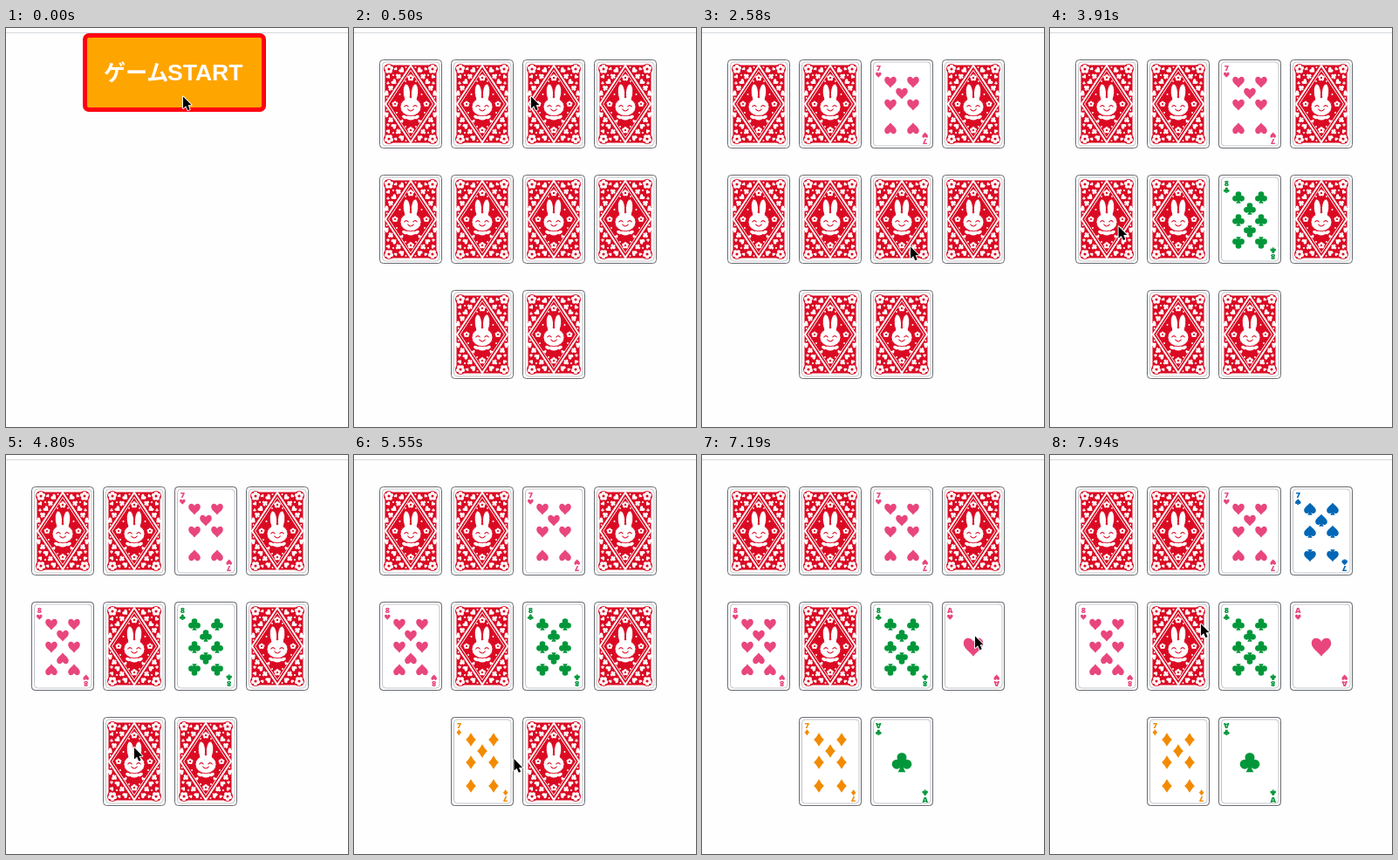
Write an HTML page that moves like this. It is 392 px wide and 457 px high and loops after 8000 ms.

```html
<!DOCTYPE html>
<html lang="ja">
<head>
<meta charset="utf-8">
<title>ゲーム</title>
<style>
html, body { margin: 0; width: 100%; height: 100%; overflow: hidden; background: #fefefe; }
svg { display: block; width: 392px; height: 457px; }
.label { font-weight: 700; fill: #fff; }
.kana { font-family: "Noto Sans CJK JP", "Noto Sans CJK", sans-serif; font-size: 25px; }
.latin { font-family: "Liberation Sans", sans-serif; font-size: 26.5px; }
.rank { font: 800 9px "Open Sans", sans-serif; text-anchor: middle; }
</style>
</head>
<body>
<svg id="stage" viewBox="0 0 392 457" xmlns="http://www.w3.org/2000/svg"></svg>
<script>
const LOOP = 8000, DEAL = 500, TICK0 = 496, TICK = 148.8;
const RED = '#db0a23';

const HEART = 'M0 9.5C-3 5-10 1.5-10-3.8C-10-10.6-2-10.6 0-5.5C2-10.6 10-10.6 10-3.8C10 1.5 3 5 0 9.5Z';
const STEM = '<path d="M-1.2 1H1.2Q1.4 7 4 10H-4Q-1.4 7-1.2 1Z"/>';
const SUITS = {
  heart: { color: '#e8467c', art: `<path d="${HEART}"/>` },
  diamond: { color: '#f28b00', art: '<path d="M0-11.5Q4-4 8.6 0Q4 4 0 11.5Q-4 4-8.6 0Q-4-4 0-11.5Z"/>' },
  club: {
    color: '#00973a',
    art: '<circle cy="-5" r="4.9"/><circle cx="-5.2" cy="2" r="4.9"/><circle cx="5.2" cy="2" r="4.9"/>' +
      '<circle r="3"/>' + STEM
  },
  spade: { color: '#0067b6', art: `<path d="${HEART}" transform="translate(0 -1.5) scale(1 -.95)"/>` + STEM }
};

// column, row, rank, suit, tick at which the card turns
const CARDS = [
  [0, 0], [1, 0], [2, 0, '7', 'heart', 9], [3, 0, '7', 'spade', 48],
  [0, 1, '8', 'heart', 24], [1, 1], [2, 1, '8', 'club', 17], [3, 1, 'A', 'heart', 44],
  [1, 2, '7', 'diamond', 31], [2, 2, 'A', 'club', 38]
];

// start tick, end tick, destination of the pointer
const MOVES = [
  [5, 7.6, 222, 98], [11, 14, 238, 249], [18, 23, 59, 223], [25, 29, 162, 354], [31, 36, 220, 333],
  [38, 39, 222, 327], [39, 42, 312, 206], [44, 46, 306, 107], [48, 50, 172, 192]
];

const at = (x, y, s, art, turn = 0) =>
  `<g transform="translate(${x} ${y}) rotate(${turn}) scale(${s})">${art}</g>`;

const paper = `<rect x=".5" y=".5" width="71" height="101" rx="4" fill="#fff" stroke="#686b70"/>
  <rect x="3.5" y="3" width="65.5" height="96" rx="4" fill="none" stroke="#a9adb3" stroke-width=".7"/>`;

function flower(x, y, r) {
  let petals = '';
  for (let i = 0; i < 5; i++) {
    const a = (i * 72 - 90) * Math.PI / 180;
    petals += `<circle cx="${x + r * .6 * Math.cos(a)}" cy="${y + r * .6 * Math.sin(a)}" r="${r * .46}"/>`;
  }
  return petals + `<circle cx="${x}" cy="${y}" r="${r * .32}" fill="${RED}"/>`;
}

const dot = (x, y, r) => `<circle cx="${x}" cy="${y}" r="${r}"/>`;

// one corner of the back: a flower and a row of suits along the diamond
function cornerArt() {
  const { heart, club } = SUITS;
  let row = '';
  for (let i = 0; i < 5; i++) {
    row += at(26 - i * 4.4, 12.5 + i * 6.7, .32, (i % 2 ? club : heart).art, -50);
  }
  return `<circle cx="11" cy="11" r="6" fill="${RED}"/>` + flower(11, 11, 4.9) + row +
    at(19, 11, .2, heart.art, -40) + at(10.5, 20, .24, heart.art, -40) + at(10, 27, .18, club.art) +
    dot(30.5, 9, 1) + dot(16, 18, 1.1) + dot(8.7, 44, .9);
}

function backArt() {
  const diamond = (inset, w) =>
    `<path d="M36 ${7 + inset * 1.5}L${65 - inset} 51L36 ${95 - inset * 1.5}L${7 + inset} 51Z" fill="${RED}" stroke="#fff" stroke-width="${w}"/>`;
  const corner = cornerArt();
  const mirrored = [[1, 1], [-1, 1], [1, -1], [-1, -1]].map(([sx, sy]) =>
    `<g transform="translate(36 51) scale(${sx} ${sy}) translate(-36 -51)">${corner}</g>`).join('');
  const sides = [-1, 1].map(s =>
    flower(36 + s * 18, 51, 3.3) + dot(36 + s * 6, 25, .9) + dot(36 + s * 12.5, 40, 1) +
    dot(36 + s * 16, 61, 1) + at(36 + s * 10, 71, .2, SUITS.heart.art, s * 30) + dot(36 + s * 6, 77, 1)).join('');
  return paper + `<rect x="6.5" y="6.5" width="59" height="89" rx="2" fill="${RED}"/>
    <g fill="#fff">${mirrored}${diamond(0, 2)}${diamond(3.6, 1)}
    ${flower(36, 21, 3.7)}${flower(36, 81, 3.7)}${sides}
    <ellipse cx="36" cy="66.5" rx="5.5" ry="3"/>
    <ellipse cx="29" cy="66" rx="3" ry="1.9" transform="rotate(25 29 66)"/>
    <ellipse cx="43" cy="66" rx="3" ry="1.9" transform="rotate(-25 43 66)"/>
    <g stroke="${RED}" stroke-width=".9">
      <ellipse cx="31.4" cy="38" rx="4.1" ry="10" transform="rotate(-4 31.4 38)"/>
      <ellipse cx="40.6" cy="38" rx="4.1" ry="10" transform="rotate(4 40.6 38)"/>
      <ellipse cx="36" cy="54.3" rx="12" ry="10.4"/>
    </g>
    <path d="M29.5 43H34.5L36 45L37.5 43H42.5L43 48H29Z"/></g>
    <g fill="none" stroke="${RED}" stroke-width="1.1" stroke-linecap="round">
      <path d="M28.7 54Q31 51.2 33.2 54M38.8 54Q41 51.2 43.3 54M32.7 57Q36 61 39.3 57"/>
    </g>`;
}

function pips(rank) {
  if (rank === 'A') return [[36, 52, 1.12]];
  const low = rank === '8' ? 78 : 79;
  const list = [[36, 39]];
  for (const x of [23, 49]) list.push([x, 26], [x, 52], [x, low, .68, 180]);
  if (rank === '8') list.push([36, 65, .68, 180]);
  return list;
}

function faceArt(rank, suit) {
  const { color, art } = SUITS[suit];
  const turned = rank === 'A' && suit === 'club';
  const index = `<g transform="translate(9.3 9.8)${turned ? ' rotate(180)' : ''}"><text class="rank" y="3.2">${rank}</text></g>` +
    at(9.3, 17.7, .33, art);
  return paper + `<g fill="${color}">${index}<g transform="rotate(180 36 52.2)">${index}</g>` +
    pips(rank).map(([x, y, s = .68, turn = 0]) => at(x, y, s, art, turn)).join('') + '</g>';
}

const stage = document.getElementById('stage');
stage.innerHTML = `<defs><g id="back">${backArt()}</g></defs>
  <rect width="392" height="457" fill="#fefefe"/>
  <path d="M0 5.5H392" stroke="#d5d9dd"/>
  <g id="start">
    <rect x="90.5" y="8.5" width="205" height="85" rx="4.5" fill="#ffa500" stroke="#ff0011" stroke-width="5"/>
    <text class="label kana" x="112" y="60">ゲーム</text>
    <text class="label latin" x="185" y="60.3">START</text>
  </g>
  <g id="table">${CARDS.map(([col, row, rank, suit]) =>
    `<g transform="translate(${29 + col * 82} ${36 + row * 132})"><use href="#back"/>` +
    (rank ? `<g class="face">${faceArt(rank, suit)}</g>` : '') + '</g>').join('')}</g>
  <g id="pointer"><path d="M1 1.5V15L4.2 12.2L6.4 17.2L8.7 16.2L6.6 11.3H10.6Z" stroke="#fff" stroke-width="1.8"
    stroke-linejoin="round" paint-order="stroke"/></g>`;

const start = document.getElementById('start');
const table = document.getElementById('table');
const pointer = document.getElementById('pointer');
const faces = [...document.querySelectorAll('.face')];
const turns = CARDS.filter(card => card[2]).map(card => card[4]);

const show = (el, on) => el.setAttribute('visibility', on ? 'inherit' : 'hidden');

function pointerAt(tick) {
  let x = 202, y = 77;
  for (const [from, to, tx, ty] of MOVES) {
    const p = Math.min(1, Math.max(0, (tick - from) / (to - from)));
    const e = p * p * (3 - 2 * p);
    x += (tx - x) * e;
    y += (ty - y) * e;
  }
  return [x, y];
}

function draw(t) {
  const tick = Math.floor((t - TICK0) / TICK);
  show(start, t < DEAL);
  show(table, t >= DEAL);
  faces.forEach((face, i) => show(face, tick >= turns[i]));
  pointer.setAttribute('transform', `translate(${pointerAt(tick).map(v => v.toFixed(1)).join(' ')})`);
}

let origin;
function loop(now) {
  origin ??= now;
  draw((now - origin) % LOOP);
  requestAnimationFrame(loop);
}
draw(0);
requestAnimationFrame(loop);
</script>
</body>
</html>
```
